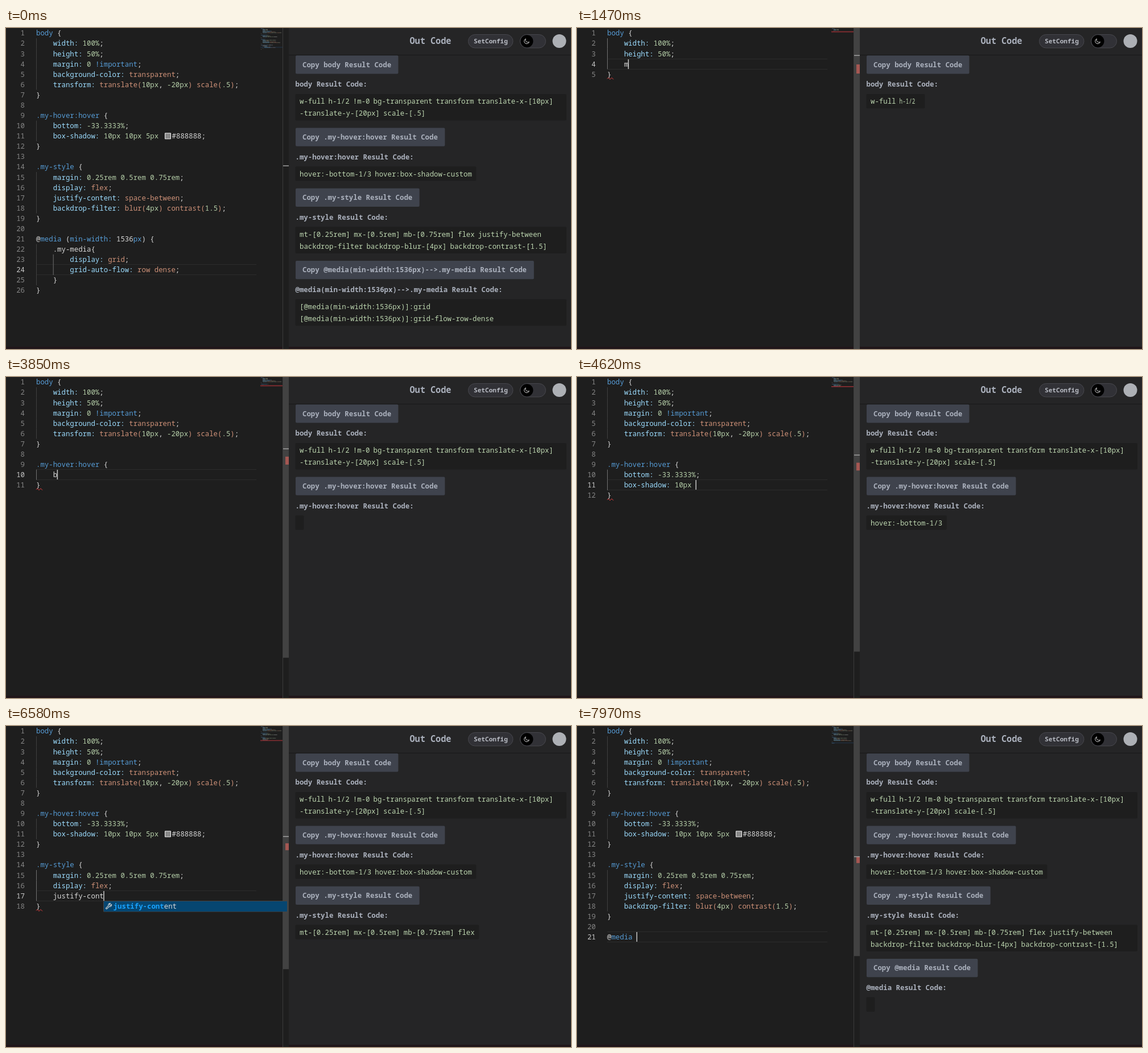
Animation of 993 by 564 pixels, one loop 8000 ms. Source, as an HTML page with a canvas:

```html
<!DOCTYPE html>
<html lang="en">
<head>
<meta charset="utf-8">
<title>Out Code</title>
<style>
  html, body { margin: 0; width: 100%; height: 100%; overflow: hidden; background: #1e1e1e; }
  canvas { display: block; }
</style>
</head>
<body>
<canvas id="stage" width="993" height="564"></canvas>
<script>
const ctx = document.getElementById("stage").getContext("2d");
const LOOP = 8000, HEIGHT = 564, ROW = 18.08, CHAR = 7.42, LEFT = 53;
const FAMILY = '"Noto Sans Mono", "DejaVu Sans Mono", monospace';
const CODE = `12.37px ${FAMILY}`, BOLD = `bold 12.4px ${FAMILY}`;
const PLAIN = "#d8d8d8", BLUE = "#569cd6", NAME = "#9cdcfe", NUMBER = "#b5cea8", VALUE = "#ce9178";
const LABEL = "#abb1bd";

// Indentation is added when drawing.
const TEXT = `body {
width: 100%;
height: 50%;
margin: 0 !important;
background-color: transparent;
transform: translate(10px, -20px) scale(.5);
}

.my-hover:hover {
bottom: -33.3333%;
box-shadow: 10px 10px 5px #888888;
}

.my-style {
margin: 0.25rem 0.5rem 0.75rem;
display: flex;
justify-content: space-between;
backdrop-filter: blur(4px) contrast(1.5);
}

@media (min-width: 1536px) {
.my-media{
display: grid;
grid-auto-flow: row dense;
}
}`;
const LINES = TEXT.split("\n");

const SELECTOR_RULES = [[/[a-z.][a-z.:-]*/y, BLUE]];
const DECLARATION_RULES = [
  [/[a-z-]+:/y, NAME], [/#\w+/y, PLAIN], [/!\w+/y, BLUE],
  [/-?(\d*\.)?\d+[a-z%]*/y, NUMBER], [/[a-z][a-z(-]*|\)/y, VALUE]
];

const PROPERTIES = `transform transition transform-origin transition-property
  transition-timing-function transition-delay transition-duration transform-style
  transform-box translate -o-transform -o-transform-origin
  margin margin-top margin-bottom margin-left margin-right margin-block-end
  margin-block-start margin-inline-end margin-inline-start margin-block margin-inline margin-trim
  width will-change max-width min-width border-width outline-width column-width
  height max-height min-height line-height
  background background-color background-image background-position background-size
  background-repeat background-clip background-origin background-attachment
  backdrop-filter backface-visibility baseline-shift
  border bottom border-radius box-shadow border-bottom border-color box-sizing border-top
  border-left border-right border-style border-collapse
  display direction flex-direction animation-direction padding padding-top padding-left
  padding-right padding-bottom
  justify-content justify-items justify-self`.split(/\s+/);
const VALUES = `transparent translate() translateX() translateY() translateZ() translate3d()
  scale() scaleX() scaleY() scale3d() flex inline-flex space-between space-around space-evenly
  blur() contrast() initial inherit unset revert`.split(/\s+/);

// Character position of a 1-based line and column.
const at = (line, col = LINES[line - 1].length) =>
  LINES.slice(0, line - 1).reduce((sum, s) => sum + s.length + 1, 0) + col;

const TYPING = [
  [70, 1, 0], [560, 1, 6], [1470, 4, 1.5], [2730, 6, 3.8], [3360, 9, 10], [3850, 10, 1.5],
  [5460, 15, 5.2], [6580, 17, 12.8], [7950, 21, 7], [8000, 21, 7]
].map(([time, line, col]) => [time, at(line, col)]);

const BLOCKS = [
  ["body", at(1), [
    [at(2), "w-full"], [at(3), "h-1/2"], [at(4), "!m-0"], [at(5), "bg-transparent"],
    [at(6, 33), "transform translate-x-[10px] -translate-y-[20px]"], [at(6), "scale-[.5]"]]],
  [".my-hover:hover", at(9), [[at(10), "hover:-bottom-1/3"], [at(11), "hover:box-shadow-custom"]]],
  [".my-style", at(14), [
    [at(15), "mt-[0.25rem] mx-[0.5rem] mb-[0.75rem]"], [at(16), "flex"], [at(17), "justify-between"],
    [at(18, 26), "backdrop-filter backdrop-blur-[4px]"], [at(18), "backdrop-contrast-[1.5]"]]],
  ["@media", at(21, 6), [
    [at(23), "[@media(min-width:1536px)]:grid"],
    [at(24), "[@media(min-width:1536px)]:grid-flow-row-dense"]]]
];

function interpolate(x, from, to) {
  const next = TYPING.findIndex(key => x <= key[from]);
  if (next < 0) return TYPING.at(-1)[to];
  if (next === 0) return TYPING[0][to];
  const a = TYPING[next - 1], b = TYPING[next];
  return a[to] + (b[to] - a[to]) * (x - a[from]) / (b[from] - a[from]);
}
const positionAt = time => interpolate(time, 0, 1);
const timeAt = position => interpolate(position, 1, 0);

function rect(x, y, w, h, color, radius = 0, border) {
  ctx.beginPath();
  ctx.roundRect(x, y, w, h, radius);
  ctx.fillStyle = color;
  ctx.fill();
  if (border) { ctx.strokeStyle = border; ctx.lineWidth = 1; ctx.stroke(); }
}
function circle(x, y, r, color) {
  ctx.beginPath();
  ctx.arc(x, y, r, 0, 2 * Math.PI);
  ctx.fillStyle = color;
  ctx.fill();
}
// y is the middle of the capitals.
function text(s, x, y, color, font = CODE) {
  ctx.font = font;
  ctx.fillStyle = color;
  ctx.fillText(s, x, y + 4.4);
}
function stroke(path, x, y, color, width = 1) {
  ctx.save();
  ctx.translate(x, y);
  ctx.strokeStyle = color;
  ctx.lineWidth = width;
  ctx.stroke(new Path2D(path));
  ctx.restore();
}

function tokenize(s, rules) {
  const tokens = [];
  for (let i = 0; i < s.length;) {
    let part = s[i], color = PLAIN;
    for (const [pattern, ruleColor] of rules) {
      pattern.lastIndex = i;
      const match = pattern.exec(s);
      if (match) { part = match[0]; color = ruleColor; break; }
    }
    tokens.push([part, color]);
    i += part.length;
  }
  return tokens;
}
function rulesFor(line, depth) {
  if (!depth) return SELECTOR_RULES;
  return line.includes(":") ? DECLARATION_RULES : [];
}

function editorState(time, finished) {
  if (finished) return { lines: LINES, current: 23, depth: 2 };
  const position = positionAt(time);
  let end = Math.floor(position);
  if (end && TEXT[end] === "}") end++;
  const typed = TEXT.slice(0, end);
  const depth = typed.split("{").length - typed.split("}").length;
  const typedLines = typed.split("\n"), current = typedLines.length - 1;
  const line = typedLines[current];
  const opening = line.endsWith("{");
  const closing = depth ? (opening ? "}" : "\n}") : "";
  let errorLine = -1;
  if (line && !/[;{}]$/.test(line)) errorLine = current + (depth ? 1 : 0);
  return {
    lines: (typed + closing).split("\n"), current, line, errorLine,
    depth: opening ? 0 : depth,
    lag: end - Math.floor(position - 0.5)
  };
}

function drawMinimap(lines, errorLine, current, depths) {
  lines.forEach((line, i) => {
    let x = 448 + depths[i] * 3;
    const y = i * 1.45 + 0.6;
    ctx.globalAlpha = 0.42;
    for (const [part, color] of tokenize(line, rulesFor(line, depths[i]))) {
      if (part !== " ") rect(x, y, part.length * 0.75, 0.9, color);
      x += part.length * 0.75;
    }
    ctx.globalAlpha = 1;
  });
  if (errorLine > current) rect(447, errorLine * 1.45, 39, 1.7, "#872d31");
  else rect(447, current * 1.45, 39, 1.2, "#264f7866");
}

function drawRuler({ lines, current, errorLine }, finished) {
  const scale = HEIGHT / (HEIGHT + Math.max(0, 14.2 * (lines.length - 5.3)));
  rect(486, 0, 1, HEIGHT, "#3c3c3c");
  if (errorLine >= 0) rect(491, 16 * errorLine * scale, 6, 16 * scale, "#c04038");
  if (!finished) rect(487, 0, 10, HEIGHT * scale, "#79797966");
  rect(487, 16 * current * scale - 0.5, 10, 1.5, "#a0a0a0");
}

function drawSuggestions({ line, current, depth, lag }) {
  const word = depth && line.match(/[a-z-]{2,}$/)?.[0];
  if (!word) return;
  const items = (line.includes(":") ? VALUES : PROPERTIES)
    .filter(item => item.includes(word))
    .sort((a, b) => a.indexOf(word) - b.indexOf(word))
    .slice(0, 12);
  if (!items.length) return;
  const x = Math.floor(LEFT + (4 * depth + line.length - lag) * CHAR) + 0.5;
  const y = Math.round(9 + current * ROW + 9) + 0.5;
  rect(x, y, 323, items.length * ROW + 0.5, "#252526", 0, "#454545");
  rect(x + 0.5, y + 0.5, 322, ROW, "#064671");
  items.forEach((item, i) => {
    const middle = y + 9.2 + i * ROW, start = item.indexOf(word), textX = x + 17.2;
    stroke("M3 9.5 L7 5.5 A3 3 0 0 0 11 1.8 L9.3 3.4 L7.8 3 L7.5 1.5 L9 0 A3 3 0 0 0 5.5 4 L1 8.5 A1.3 1.3 0 0 0 3 9.5",
      x + 3, middle - 5, "#d0d0d0", 1.2);
    text(item.slice(0, start), textX, middle, PLAIN);
    text(word, textX + start * CHAR, middle, "#18a3ff", `bold ${CODE}`);
    text(item.slice(start + word.length), textX + (start + word.length) * CHAR, middle, PLAIN);
  });
  if (items.length === 12) rect(x + 315, y, 8, 44, "#79797955");
}

function drawEditor(time, finished) {
  const state = editorState(time, finished);
  const { lines, current, errorLine, depth } = state;
  rect(0, 0, 497, HEIGHT, "#1e1e1e");

  const top = Math.round(9 + current * ROW - 9.5);
  rect(LEFT, top, 387, 1, "#2c2c2c");
  rect(LEFT, top + 18, 387, 1, "#2c2c2c");

  const depths = [];
  let level = 0;
  lines.forEach((line, i) => {
    const y = 9 + i * ROW, number = String(i + 1);
    if (line.startsWith("}")) level--;
    depths[i] = level;
    text(number, 33 - number.length * CHAR, y, i === current ? "#c6c6c6" : "#858585");

    const opener = lines.slice(0, current).findLastIndex(s => s.endsWith("{"));
    for (let g = 0; g < level; g++) {
      const active = g === depth - 1 && i > opener;
      rect(LEFT + g * 4 * CHAR, y - 9, 1, ROW, active ? "#707070" : "#404040");
    }

    let x = LEFT + level * 4 * CHAR;
    for (const [part, color] of tokenize(line, rulesFor(line, level))) {
      if (part === "#888888" && (finished || time > 5600)) {
        rect(x + 3.9, y - 5, 10, 10, "#888888", 0, "#eeeeee");
        x += 16;
      }
      text(part, x, y, color);
      x += part.length * CHAR;
    }
    if (i === errorLine && i > current) stroke("M0 2 L2 0 L5 3 L8 0 L11 3", LEFT, y + 6, "#e04040");
    if (line.endsWith("{")) level++;
  });

  drawMinimap(lines, errorLine, current, depths);
  drawRuler(state, finished);
  if (!finished) {
    rect(LEFT + (4 * depths[current] + state.line.length) * CHAR - 0.5, top + 1, 1.5, 17, "#c8c8c8");
    drawSuggestions(state);
  }
}

// Wraps the words and returns each with its place.
function layoutWords(words) {
  let x = 516, row = 0;
  const placed = words.map(([word, grow]) => {
    const width = word.length * CHAR;
    if (x > 516 && x + width > 978) { x = 516; row++; }
    const place = { word, grow, x, row };
    x += width + 6.1;
    return place;
  });
  const right = row ? 985 : words.length ? x + 1.4 : 523.5;
  return { placed, rows: row + 1, right };
}

function drawResults(time, finished) {
  let top = 48;
  for (const [selector, start, groups] of BLOCKS) {
    if (!finished && time < timeAt(start) + 20) break;
    const title = finished && selector === "@media" ? "@media(min-width:1536px)-->.my-media" : selector;
    const label = `Copy ${title} Result Code`;
    rect(509, top + 0.3, label.length * 7.45 + 24, 32.2, "#3f434d", 2);
    text(label, 521, top + 16.2, LABEL, BOLD);
    text(`${title} Result Code:`, 508.5, top + 50.8, LABEL, BOLD);

    const words = groups.flatMap(([position, names]) => {
      const grow = finished ? 1 : Math.min(1, (time - timeAt(position)) / 108);
      return grow > 0 ? names.split(" ").map(name => [name, grow]) : [];
    });
    const { placed, rows, right } = layoutWords(words);
    rect(508.5, top + 67.9, right - 508.5, 25.4 + 21.2 * (rows - 1), "#1e1e1e", 2);
    for (const { word, grow, x, row } of placed) {
      ctx.save();
      ctx.translate(x, 0);
      ctx.scale(grow, 1);
      text(word, 0, top + 80.8 + row * 21.2, "#bcd5af");
      ctx.restore();
    }
    top += 106.1 + 21.2 * (rows - 1);
  }
}

function drawHeader() {
  rect(497, 0, 496, HEIGHT, "#252526");
  rect(497, 47, 496, 1, "#181818");
  text("Out Code", 709.5, 23.6, LABEL, `bold 15.2px ${FAMILY}`);
  rect(812.5, 11.5, 78.5, 23.5, "#313136", 12, "#47474d");
  text("SetConfig", 822, 23, "#b8bbc3", `bold 11.1px ${FAMILY}`);
  rect(903.5, 11.5, 45, 23.5, "#313136", 12, "#47474d");
  circle(915.5, 23.2, 11, "#000000");
  stroke("M-1.5 -4 A4.5 4.5 0 1 0 4.5 1.5 A4.2 4.2 0 0 1 -1.5 -4 Z", 915, 23, "#d0d0d0");
  circle(972.5, 23, 12, "#adb0b5");
}

function draw(now) {
  const time = now % LOOP, finished = time < 70;
  ctx.clearRect(0, 0, 993, HEIGHT);
  drawHeader();
  drawResults(time, finished);
  drawEditor(time, finished);
  rect(0, 560, 486, 4, "#201619");
  rect(497, 560, 496, 4, "#201619");
  requestAnimationFrame(loop);
}
const origin = performance.now();
function loop() { draw(Math.max(0, performance.now() - origin)); }
loop();
</script>
</body>
</html>
```
